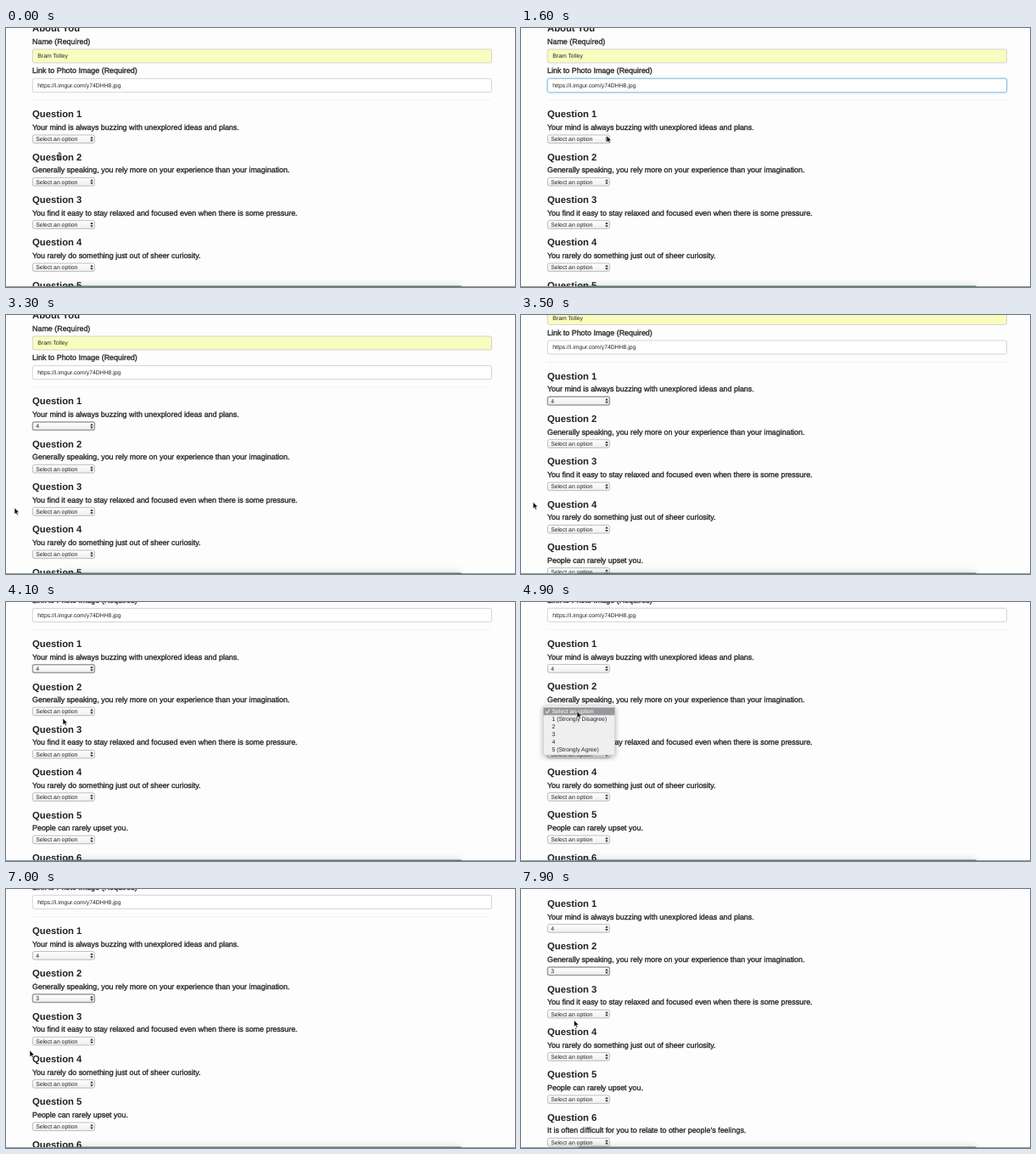
An HTML page that plays this animation: 600x305 px, repeating every 8000 ms.

```html
<!DOCTYPE html>
<html lang="en">
<head>
<meta charset="utf-8">
<title>Survey form</title>
<style>
  html, body { margin: 0; width: 100%; height: 100%; overflow: hidden; background: #fdfdfd; }
  svg { display: block; width: 600px; height: 305px; }
  text { font-family: "Liberation Sans", Arial, sans-serif; font-size: 6.85px; fill: #222;
         text-rendering: geometricPrecision; white-space: pre; }
  .heading { font-size: 11.3px; font-weight: bold; }
  .label { font-size: 8.92px; stroke: #222; stroke-width: .32px; }
  .field { fill: #fff; stroke: #c8c8c8; stroke-width: .8px; }
  .select { fill: url(#button); stroke: #adadad; stroke-width: .8px; }
  .focused { stroke: #9c9ca1; stroke-width: 1.5px; }
  .link-focus { stroke: #7fb9d6; filter: drop-shadow(0 0 1.2px #8cc8e8); }
  .dock { fill: #667873; filter: drop-shadow(0 0 4px #0003); }
  #menu .box { fill: #efeff0; stroke: #ccc; stroke-width: .5px; filter: drop-shadow(0 2px 3px #0005); }
  #menu .hover { fill: #98989c; }
  #menu .active { fill: #fff; }
</style>
</head>
<body>
<svg viewBox="0 0 600 305">
  <defs>
    <linearGradient id="button" x2="0" y2="1">
      <stop stop-color="#fff"/><stop offset="1" stop-color="#eee"/>
    </linearGradient>
  </defs>
  <g id="page">
    <text class="heading" x="31" y="4.4">About You</text>
    <text class="label" x="31" y="18.9">Name (Required)</text>
    <rect class="field" x="31.3" y="25" width="541.2" height="16" rx="2" style="fill:#f9fcbf"/>
    <text x="37.3" y="35.3">Bram Tolley</text>
    <text class="label" x="31" y="53.2">Link to Photo Image (Required)</text>
    <rect id="link" class="field" x="31.3" y="59.7" width="541.2" height="16" rx="2"/>
    <text x="37.3" y="70">https://i.imgur.com/y74DHH8.jpg</text>
    <path d="M31 85.2H572.5" stroke="#ececec" stroke-width=".7"/>
    <g id="questions"></g>
    <g id="menu"></g>
  </g>
  <path d="M0 304.5H600" stroke="#8e9a96"/>
  <rect class="dock" x="67" y="303.5" width="470" height="4" rx="1"/>
  <path id="arrow" d="M0 0V7.8L1.8 6.1 3 8.8 4.3 8.2 3.2 5.6H5.6Z" fill="#111" stroke="#fff" stroke-width=".5"/>
  <path id="beam" d="M-1.5-4H1.5M0-4V4M-1.5 4H1.5" stroke="#222" stroke-width=".9"/>
</svg>
<script>
const $ = id => document.getElementById(id);
const LOOP = 8000, STEP = 100, GLIDE = 600;
const ROW = 9, PITCH = 50.35, FIRST = 130.8;

const prompts = [
  'Your mind is always buzzing with unexplored ideas and plans.',
  'Generally speaking, you rely more on your experience than your imagination.',
  'You find it easy to stay relaxed and focused even when there is some pressure.',
  'You rarely do something just out of sheer curiosity.',
  'People can rarely upset you.',
  'It is often difficult for you to relate to other people’s feelings.'
];
const options = ['Select an option', '1 (Strongly Disagree)', '2', '3', '4', '5 (Strongly Agree)'];

// When each menu opens, closes with a choice, and its select loses focus
const answers = [
  { open: 1700, close: 2700, blur: 4700, value: 4 },
  { open: 4700, close: 6300, blur: LOOP, value: 3 }
];
const linkClick = 900;
const scrolls = [{ at: 3400, by: 52.4, settle: 120 }, { at: 7000, by: 32, settle: 60 }];

const centerOf = i => FIRST + PITCH * i;
const onOption = (question, option, scrolled) => [66, centerOf(question) + option * ROW - scrolled];

// Each move glides from wherever the pointer is to a new place
const home = [63, 151];
const moves = [
  { at: 0, to: [62, 134] },
  { at: 300, to: [84, 36] },
  { at: 700, to: [90, 66] },
  { at: 1000, to: [101, 127] },
  { at: 1750, to: onOption(0, 4, 0) },
  { at: 2700, to: [10, 227] },
  { at: 3400, to: [67, 137] },
  { at: 4100, to: onOption(1, 0, scrolls[0].by) },
  { at: 5100, to: onOption(1, 2, scrolls[0].by) },
  { at: 5700, to: onOption(1, 3, scrolls[0].by) },
  { at: 6300, to: [28, 190] },
  { at: 7200, to: [62.5, 154.5] }
];

const clamp = (v, low, high) => Math.max(low, Math.min(high, v));
const smooth = p => p * p * (3 - 2 * p);

const pointerAt = t => moves.reduce((from, { at, to }) => {
  const p = smooth(clamp((t - at) / GLIDE, 0, 1));
  return from.map((v, k) => v + (to[k] - v) * p);
}, home);

const scrollAt = t => scrolls.reduce((sum, { at, by, settle }) =>
  sum + by * (1 - Math.exp(-Math.max(0, t - at) / settle)), 0);

// Text lies in the two fields at the top and above each select
function isOverText(x, pageY) {
  const offset = (pageY - FIRST + PITCH) % PITCH;
  return x > 31 && (pageY < 76 || offset > 14 && offset < 42);
}

$('questions').innerHTML = prompts.map((prompt, i) => `
  <g transform="translate(0 ${centerOf(i)})">
    <text class="heading" x="31" y="-25.4">Question ${i + 1}</text>
    <text class="label" x="31" y="-10.9">${prompt}</text>
    <rect class="select" x="31.4" y="-4.8" width="73" height="9.6" rx="2"/>
    <text class="value" x="35.2" y="2.4"></text>
    <path d="M99.2-.6L101-3.1 102.8-.6ZM99.2.7L101 3.2 102.8.7Z" fill="#333"/>
  </g>`).join('');
const selects = document.querySelectorAll('.select');
const values = document.querySelectorAll('.value');

function menuMarkup(hover) {
  const rows = options.map((option, i) =>
    `<text class="${i === hover ? 'active' : ''}" x="36.5" y="${i * ROW + 2.4}">${option}</text>`);
  return `<rect class="box" x="26.5" y="-6.8" width="84" height="58.4" rx="2.2"/>
    <rect class="hover" x="26.5" y="${(hover - .5) * ROW}" width="84" height="${ROW}"/>
    ${rows.join('')}
    <path d="M29.4 .2L30.9 2.2 33.6-2.4" fill="none" stroke="${hover ? '#222' : '#fff'}"/>`;
}

function draw(now) {
  const t = Math.floor(now % LOOP / STEP) * STEP;
  const [x, y] = pointerAt(t);
  const scroll = scrollAt(t);
  $('page').setAttribute('transform', `translate(0 ${-scroll})`);
  $('link').classList.toggle('link-focus', t >= linkClick && t < answers[0].open);

  prompts.forEach((_, i) => {
    const answer = answers[i];
    const answered = !!answer && t >= answer.close;
    values[i].textContent = options[answered ? answer.value : 0];
    selects[i].classList.toggle('focused', answered && t < answer.blur);
  });

  const opened = answers.findIndex(a => t >= a.open && t < a.close);
  $('menu').innerHTML = '';
  if (opened >= 0) {
    const center = centerOf(opened);
    const hover = clamp(Math.round((y + scroll - center) / ROW), 0, options.length - 1);
    $('menu').setAttribute('transform', `translate(0 ${center})`);
    $('menu').innerHTML = menuMarkup(hover);
  }

  const beam = opened < 0 && isOverText(x, y + scroll);
  for (const id of ['arrow', 'beam']) {
    $(id).setAttribute('transform', `translate(${x} ${y})`);
    $(id).style.display = (id === 'beam') === beam ? '' : 'none';
  }
}

const start = performance.now();
function tick() {
  draw(performance.now() - start);
  requestAnimationFrame(tick);
}
tick();
</script>
</body>
</html>
```
